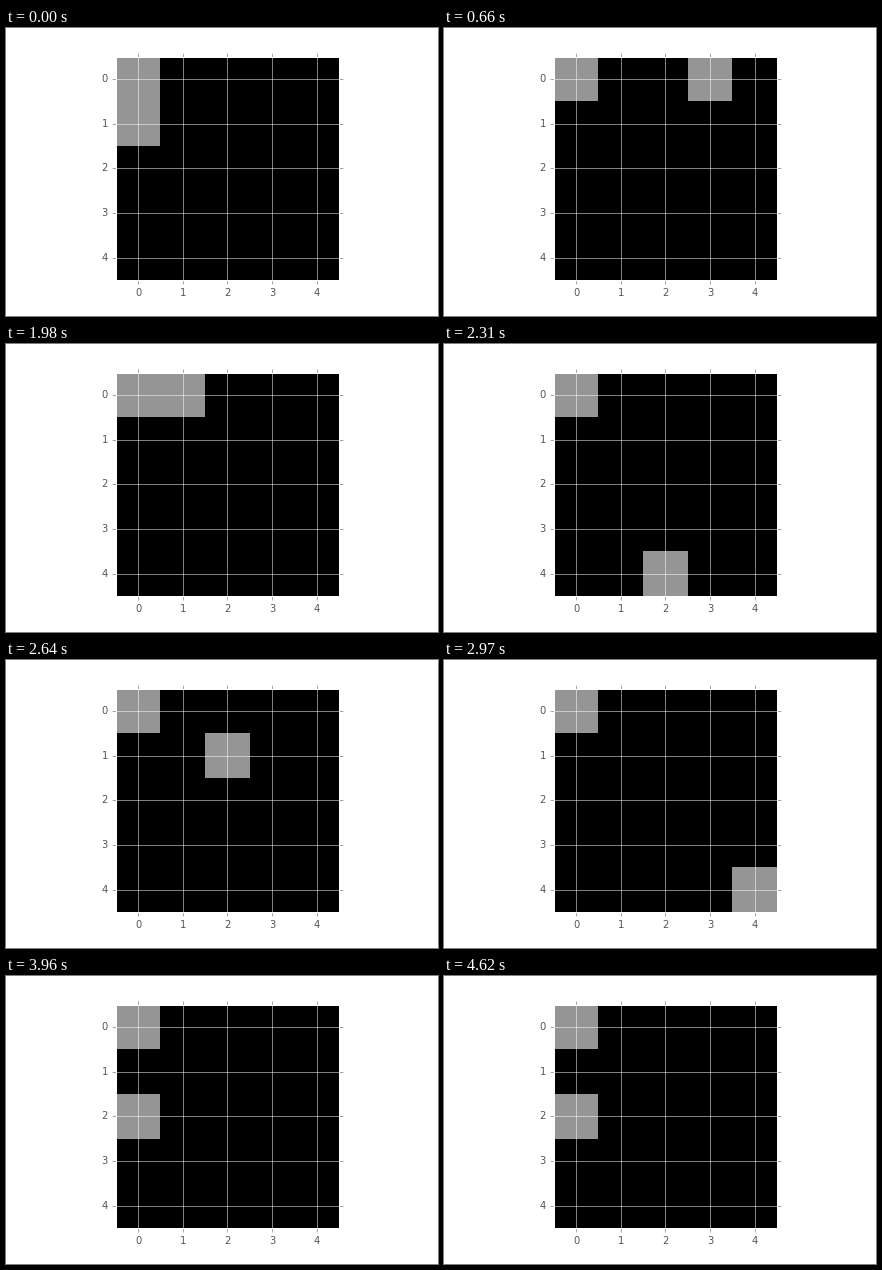
A matplotlib script for the animation above (4.95 s loop, 432 px wide and 288 px high).

```python
import matplotlib.pyplot as plt
from matplotlib.animation import FuncAnimation
from matplotlib.patches import Rectangle

W, H, DPI = 432, 288, 72
SIZE = 5
STEP_MS = 330
GREY = (149 / 255,) * 3
LABEL = "#555555"

# Stops of the jumping cell, counted row by row from the top left
STOPS = [5, 14, 3, 23, 10, 16, 1, 22, 7, 24, 9, 4, 10, 1, 10]

plt.rcParams["font.family"] = "DejaVu Sans"
plt.rcParams["axes.axisbelow"] = True
plt.rcParams["ytick.alignment"] = "center"


def make_board():
    """Black square board with white grid lines and ticks on all sides."""
    fig = plt.figure(figsize=(W / DPI, H / DPI), dpi=DPI, facecolor="white")
    side = 0.775 * H
    left = 0.5125 * W - side / 2
    ax = fig.add_axes([left / W, 0.125, side / W, side / H], facecolor="black")
    ax.set(xlim=(-0.5, SIZE - 0.5), ylim=(SIZE - 0.5, -0.5),
           xticks=range(SIZE), yticks=range(SIZE))
    ax.tick_params(direction="out", length=4, width=0.5, pad=4, color=LABEL,
                   labelcolor=LABEL, labelsize=10, top=True, right=True)
    ax.grid(True, color="white", linewidth=0.5, linestyle="-")
    for spine in ax.spines.values():
        spine.set(color="white", linewidth=1)
    return fig, ax


def corner(index):
    row, col = divmod(index, SIZE)
    return col - 0.5, row - 0.5


def add_cell(ax, index):
    return ax.add_patch(Rectangle(corner(index), 1, 1, facecolor=GREY,
                                  linewidth=0, zorder=0.1, snap=True))


fig, ax = make_board()
add_cell(ax, 0)
mover = add_cell(ax, STOPS[0])


def update(step):
    mover.set_xy(corner(STOPS[step]))
    return [mover]


def reset():
    return update(0)


anim = FuncAnimation(fig, update, frames=len(STOPS), init_func=reset,
                     interval=STEP_MS, repeat=True, repeat_delay=0)
plt.show()
```
